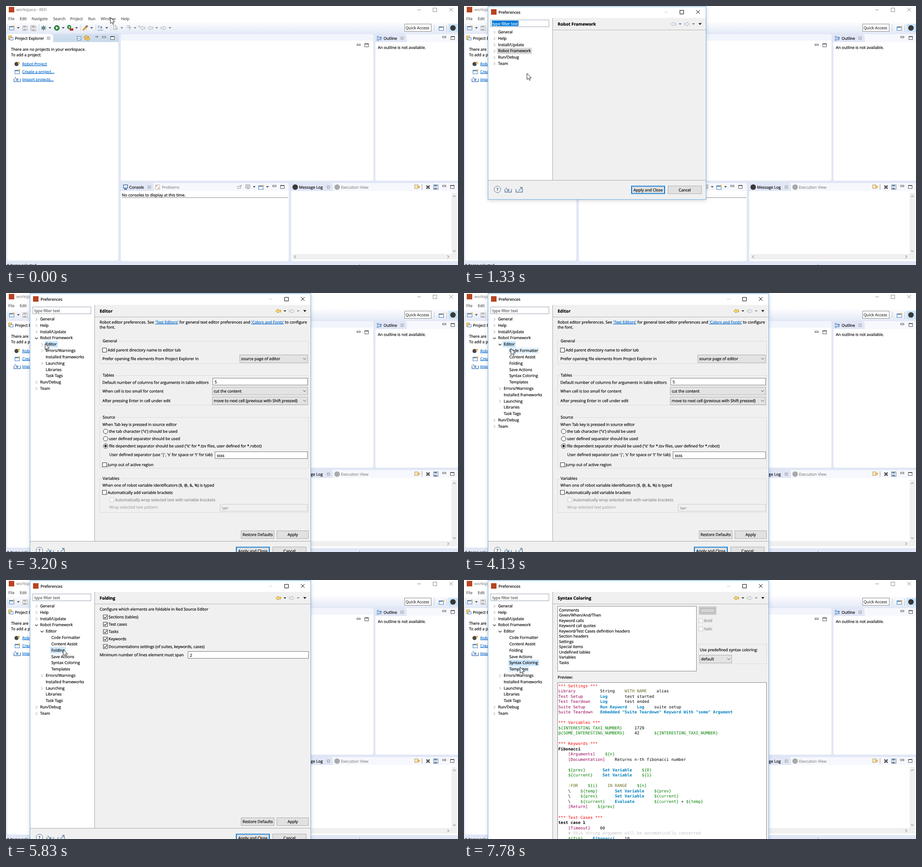
Animation, 987 px wide and 567 px high, one loop 8 s. Source, as an HTML page:

```html
<!DOCTYPE html>
<html lang="en">
<head>
<meta charset="utf-8">
<title>Preferences tour</title>
<style>
html, body { margin: 0; width: 100%; height: 100%; overflow: hidden; background: #fff; }
svg { display: block; width: 100vw; height: 100vh; }
text { font: 8.6px "Open Sans", "Noto Sans", sans-serif; white-space: pre; text-rendering: geometricPrecision; stroke-width: .2px; }
.head { font-size: 9.4px; font-weight: 700; }
.code { font: 8.92px "DejaVu Sans Mono", "Liberation Mono", monospace; stroke: none; }
.link { fill: #0066cc; stroke: #0066cc; text-decoration: underline; }
.mid { text-anchor: middle; }
.b { font-weight: 700; }
#dialog { transform-origin: 290px 212px; }
</style>
</head>
<body>
<svg id="stage" viewBox="0 0 987 567" xmlns="http://www.w3.org/2000/svg"></svg>
<script type="text/plain" id="sample">
*** Settings ***
Library          String    WITH NAME    alias
Test Setup       Log       test started
Test Teardown    Log       test ended
Suite Setup      Run Keyword    Log    suite setup
Suite Teardown   Embedded "Suite Teardown" Keyword With "some" Argument

*** Variables ***
${INTERESTING_TAXI_NUMBER}     1729
@{SOME_INTERESTING_NUMBERS}    42      ${INTERESTING_TAXI_NUMBER}

*** Keywords ***
Fibonacci
    [Arguments]    ${n}
    [Documentation]    Returns n-th fibonacci number

    ${prev}       Set Variable    ${0}
    ${current}    Set Variable    ${1}

    :FOR    ${i}    IN RANGE    ${n}
    \    ${temp}       Set Variable    ${prev}
    \    ${prev}       Set Variable    ${current}
    \    ${current}    Evaluate        ${current} + ${temp}
    [Return]    ${prev}

*** Test Cases ***
test case 1
    [Timeout]    60
    # this string argument will be automatically converted
    ${fib}    Fibonacci    10
</script>
<script>
const LOOP = 8000;
const BLUE = '#4a7ebb', GREY = '#a8a8a8', DIM = '#8a8a8a';

// ---- drawing helpers (text y is the middle of the line) ----
const esc = s => s.replace(/&/g, '&amp;').replace(/</g, '&lt;');
const raw = (x, y, inner, fill = '#000', cls = '') =>
  `<text x="${x}" y="${y + 3}" fill="${fill}" stroke="${fill}" class="${cls}">${inner}</text>`;
const txt = (x, y, s, fill, cls) => raw(x, y, esc(s), fill, cls);
const rect = (x, y, w, h, fill, line) => line
  ? `<rect x="${x + .5}" y="${y + .5}" width="${w - 1}" height="${h - 1}" fill="${fill}" stroke="${line}"/>`
  : `<rect x="${x}" y="${y}" width="${w}" height="${h}" fill="${fill}"/>`;
const path = (d, line = 'none', w = 1, fill = 'none') =>
  `<path d="${d}" stroke="${line}" stroke-width="${w}" fill="${fill}"/>`;
const dot = (x, y, r, fill, line = 'none') =>
  `<circle cx="${x}" cy="${y}" r="${r}" fill="${fill}" stroke="${line}"/>`;
const link = s => `<tspan class="link">${s}</tspan>`;

const drop = (x, y, c = '#333') => path(`M${x - 3} ${y - 1.5}h6l-3 3z`, 'none', 0, c);
const grip = x => path(`M${x} 41v14`, '#a5a9b5', 1.2).replace('/>', ' stroke-dasharray="1.5 2"/>');
const arrow = (x, y, dir, line, fill) =>
  path(`M${x - 5.5 * dir} ${y}l${5 * dir} -4v2h${6 * dir}v4h${-6 * dir}v2z`, line, 1, fill);
const logo = (x, y) => rect(x, y, 12, 12, '#b84420');
const tabClose = (x, y) => {
  const d = `M${x - 3} ${y - 3}l6 6m0 -6l-6 6`;
  return path(d, '#707680', 3) + path(d, '#fff', 1.2);
};
const minIcon = (x, y) => rect(x - 4, y - 3, 8, 4, '#fff', '#555');
const maxIcon = (x, y) => rect(x - 4, y - 4, 9, 8, '#fff', '#555') + rect(x - 4, y - 4, 9, 2, '#555');
const windowIcon = (x, y, star = '#e8b23a') =>
  rect(x - 6, y - 4, 11, 9, '#f4f9ff', BLUE) + rect(x - 6, y - 4, 11, 2.5, BLUE) + dot(x + 4, y - 3.5, 2, star);
const disk = (x, y, c) => rect(x - 5, y - 5, 11, 11, '#f0f0f0', c) + rect(x - 3, y - 5, 6, 4, c) + rect(x - 3, y + 2, 6, 3, c);
const tray = (x, y, dir, c) => path(`M${x - 6.5} ${y - 2}v6.500h14v-6.500`, c, 1.5) +
  (dir > 0 ? path(`M${x - 5} ${y - 5}l7 6.500m0 -4.500v4.500h-4.500`, c, 1.3) : path(`M${x - 1} ${y + 1.5}l8 -7.500m-4.500 0h4.500v4.500`, c, 1.3));
const listIcon = (x, y, c) => rect(x - 5, y - 4, 10, 8, '#fff', c) + path(`M${x - 3} ${y - 1}h6m-6 2h6M${x - 2} ${y + 5}h5`, c);
const frameButtons = (x, y, c, minColor = c) => path(`M${x - 4} ${y + .5}h8`, minColor) +
  rect(x + 30, y - 4, 9, 9, 'none', c) + path(`M${x + 66} ${y - 4}l8 8m0 -8l-8 8`, c);

// ---- workbench ----
const panel = (x, y, w, h) => `<rect x="${x}" y="${y}" width="${w}" height="${h}" rx="4" fill="#fff" stroke="#dae1f2"/>`;
const tab = (x, y, right, fill) =>
  path(`M${x} ${y + 18}V${y + 4}q0 -4 4 -4H${right - 7}q7 0 7 7v11z`, 'none', 0, fill);

function toolbar() {
  let s = rect(0, 36, 987, 25, 'url(#bar)');
  for (const x of [4, 72, 163, 196, 229, 935]) s += grip(x);
  for (const x of [27, 96, 125, 154, 187, 220]) s += drop(x, 48);
  for (const x of [253, 282, 329, 358]) s += drop(x, 48, '#777');
  s += windowIcon(13, 48) + disk(41, 48, '#b5b5b5') + disk(58, 47, '#c4c4c4') + disk(60, 49, '#b5b5b5');
  s += path('M77 44l10 8m0 -8l-10 8M76 48h12M82 42v12', '#3b6372') + dot(82, 48, 3, '#6f9e86', '#2f5a62');
  s += dot(111, 48, 5.5, '#2f8a3f', '#1e6a2e') + path('M109 45l5 3 -5 3z', 'none', 0, '#fff');
  s += dot(138, 46, 4.5, '#2f8a3f') + path('M137 44l4 2 -4 2z', 'none', 0, '#fff') + rect(139, 49, 8, 5, '#b23a32');
  s += path('M168 53l7 -7', '#d9a441', 4) + path('M174 47l4 -4', '#9a7a55', 4);
  s += path('M200 44h6m-6 3h4m-4 6h12', BLUE, 1.2) + path('M208 44v5m-2 -2l2 2 2 -2', '#333');
  s += rect(234, 42, 6, 10, '#eee', GREY) + path('M242 44v8m-3 -3l3 3 3 -3', GREY);
  s += path('M263 43h8m-8 4h4m3 6v-8m-3 3l3 -3 3 3', GREY, 1.2);
  s += arrow(298, 48, 1, GREY, '#f5f5f5') + path('M291 42v5m-2 -2.500h4', GREY);
  s += arrow(315, 48, 1, GREY, '#f5f5f5') + arrow(344, 48, -1, GREY, '#f5f5f5');
  s += rect(870, 39, 59, 17, '#fff', '#8b8b8b') + txt(872.5, 48, 'Quick Access', '#333');
  s += windowIcon(951, 49) + path('M962.500 41v15', '#b5bccb');
  return s + rect(966, 39, 21, 18, '#cbe4f8') + dot(976, 48, 6, '#383838');
}

function workbench() {
  let s = rect(0, 0, 987, 567, '#e1e7f6') + rect(0, 0, 987, 36, '#fff') + logo(6, 2);
  [[5, 'File'], [30, 'Edit'], [56, 'Navigate'], [103, 'Search'], [140, 'Project'], [179.5, 'Run'], [207, 'Window'], [251, 'Help']]
    .forEach(([x, name]) => s += txt(x, 27.5, name, '#555'));
  s += toolbar();

  s += panel(2, 61, 244, 497) + path('M2 79V65q0 -4 4 -4H242q4 0 4 4v14z', 'none', 0, 'url(#active)') + tab(2, 61, 103, '#fff');
  s += rect(5, 65, 8, 9, '#f6d98c', '#c08a2c') + rect(8, 69, 8, 6, '#fff', BLUE) + txt(19.5, 70.5, 'Project Explorer') + tabClose(93, 70.5);
  s += rect(155, 66, 9, 9, '#f4f9ff', BLUE) + path('M157 70.500h5', BLUE) + arrow(175, 68, 1, '#c28a20', '#f3cf6b') + arrow(178, 72, -1, '#c28a20', '#f3cf6b');
  s += path('M195.500 66.500h6l-3 3z', '#555', 1, '#fff') + minIcon(214, 69) + maxIcon(232, 70);
  s += txt(11, 95, 'There are no projects in your workspace.') + txt(11, 106.5, 'To add a project:');
  s += dot(23, 127, 4.5, '#484848') + rect(26, 122, 4, 5, '#e5b95a');
  s += windowIcon(25, 144) + tray(24, 161, 1, BLUE);
  ['Robot Project', 'Create a project...', 'Import projects...'].forEach((n, i) => s += raw(35.5, 126.5 + 17 * i, link(n)));

  s += panel(250, 61, 553, 322) + rect(251, 62, 551, 14, '#f2f5fc') + minIcon(770, 86) + maxIcon(787, 86);

  s += panel(806, 61, 186, 322) + rect(807, 62, 180, 17, '#f6f8fd') + tab(806, 61, 875, '#e1e7f6');
  s += rect(810, 66, 4, 4, '#fff', BLUE) + rect(810, 72, 4, 4, '#fff', BLUE) + path('M815 68.500h5m-5 5h5m-4 -3h5', BLUE, 1.3);
  s += txt(824.5, 70.5, 'Outline') + tabClose(865, 70.5) + minIcon(957, 69) + maxIcon(975, 70) + txt(812, 91, 'An outline is not available.');

  s += panel(250, 387, 368, 172) + rect(251, 388, 366, 17, '#f6f8fd') + tab(250, 387, 323, '#e1e7f6');
  s += rect(256, 391, 10, 8, '#dcebfa', '#244f86') + rect(258, 400, 6, 2, '#244f86') + txt(269, 396.5, 'Console') + tabClose(313, 396.5);
  s += rect(326, 391, 10, 11, '#fff', '#b9b9b9') + dot(329, 394, 1.6, '#d88') + dot(333, 399, 1.8, '#e5bd78') + txt(340.5, 396.5, 'Problems', DIM);
  s += rect(505, 394, 8, 6, '#eee', GREY) + path('M510 395l5 -3', GREY, 2) + listIcon(528, 395, DIM) + drop(542, 396) + windowIcon(557, 397) + drop(571, 396);
  s += minIcon(586, 395) + maxIcon(603, 396) + txt(253, 413.5, 'No consoles to display at this time.') + path('M253 419.500h363', '#8c8c8c');

  s += panel(622, 387, 370, 172) + rect(623, 388, 364, 17, '#f6f8fd') + tab(622, 387, 714, '#e1e7f6');
  s += dot(631.5, 396.5, 6, '#383838') + txt(640, 396.5, 'Message Log') + tabClose(704, 396.5) + dot(723, 396.5, 6, '#a9a9a9') + txt(731.5, 396.5, 'Execution View', DIM);
  s += rect(892, 391, 8, 9, '#f5e8c8', '#b79a66') + dot(901, 396, 3, '#e6b85c') + path('M908.500 390v12', '#999');
  s += path('M918 393l7 7m0 -7l-7 7', '#555', 2.6) + disk(938, 396, '#6d87aa') + minIcon(957, 395) + maxIcon(974, 396);
  s += rect(973, 409, 12, 134, '#f0f0f0') + rect(625, 543, 360, 12, '#f0f0f0');
  s += path('M976 418l3 -3 3 3M976 535l3 3 3 -3M633 546l-3 3 3 3M964 546l3 3 -3 3', '#999', 1.2);
  return s + txt(2, 568, '0 items selected') + path('M772.500 564v3', '#999');
}

// ---- Window menu ----
const MENU = ['New Window', 'Editor', 'Appearance', '-', 'Show View', 'Perspective', '-', 'Navigation', '-', 'Preferences'];
const menuRow = (y, name, fill) => rect(203.5, y, 119, 16.8, fill) + txt(228, y + 8.4, name, '#333');

function menu(cursorY) {
  let s = rect(204, 20, 40, 16, '#cce8ff', '#99d1ff') + txt(207, 27.5, 'Window', '#333') +
    `<g filter="url(#soft)">${rect(201, 36, 124, 137, '#f2f2f2', '#ccc')}</g>`;
  let y = 38;
  for (const name of MENU) {
    if (name === '-') { s += path(`M226 ${y + 2.7}h96`, '#d2d2d2'); y += 5.5; continue; }
    s += menuRow(y, name, cursorY >= y && cursorY < y + 16.6 ? '#91c9f7' : '#f2f2f2');
    if (!/New|Pref/.test(name)) s += path(`M314 ${y + 6}l2.500 2.500 -2.500 2.500`, '#333');
    y += 16.6;
  }
  return s;
}

// ---- preference tree ----
const pen = document.createElement('canvas').getContext('2d');
pen.font = '8.6px "Open Sans", "Noto Sans", sans-serif';
const EDITOR_PAGES = ['Code Formatter', 'Content Assist', 'Folding', 'Save Actions', 'Syntax Coloring', 'Templates'];

function treeRows(t) {
  const root = t >= 2110, editor = t >= 3670;
  const leaf = (depth, names) => names.map(n => [depth, n, '']);
  const shut = (depth, names) => names.map(n => [depth, n, '>']);
  return [...shut(0, ['General', 'Help', 'Install/Update']), [0, 'Robot Framework', root ? 'v' : '>'],
    ...(root ? [[1, 'Editor', editor ? 'v' : '>'], ...(editor ? leaf(2, EDITOR_PAGES) : []),
      ...shut(1, ['Errors/Warnings']), ...leaf(1, ['Installed frameworks']),
      ...shut(1, ['Launching']), ...leaf(1, ['Libraries', 'Task Tags'])] : []),
    ...shut(0, ['Run/Debug', 'Team'])];
}

function tree(t, picked, cur) {
  return treeRows(t).map(([depth, name, mark], i) => {
    const x = 74.5 + 12.2 * depth, y = 57 + 13.82 * i, w = pen.measureText(name).width + 5;
    const over = Math.abs(cur.y - y) < 6.91 && cur.x > x - 3 && cur.x < x + w;
    const fill = name === picked ? (t < 2110 ? '#d9d9d9' : '#cce8ff') : over ? '#e5f3ff' : '';
    const ax = x - 8;
    return (fill ? rect(x - 2.5, y - 7, w, 13.8, fill) : '') + txt(x, y, name) +
      (mark === '>' ? path(`M${ax - 1.5} ${y - 2.5}l3 3 -3 3`, '#8c8c8c') : '') +
      (mark === 'v' ? path(`M${ax - 3} ${y - 1}l3 3 3 -3`, '#333', 1.2) : '');
  }).join('');
}

// ---- form controls ----
const check = (x, y, label, on, off) => rect(x, y - 5, 10, 10, off ? '#f8f8f8' : '#fff', off ? '#ccc' : '#333') +
  (on ? path(`M${x + 2} ${y}l2.300 2.500 4 -5`, '#222', 1.2) : '') + txt(x + 12, y, label, off ? DIM : '#000');
const radio = (y, label, on) => dot(217.5, y, 5, '#fff', '#333') + (on ? dot(217.5, y, 2.7, '#222') : '') + txt(225, y, label);
const field = (x, y, right, value, off) =>
  rect(x, y - 8, right - x, 16, off ? '#f0f0f0' : '#fff', off ? '#ccc' : '#7a7a7a') + txt(x + 4.5, y + .5, value, off ? DIM : '#000');
const combo = (x, y, right, value) => rect(x, y - 9, right - x, 18, '#e3e3e3', '#adadad') + txt(x + 3.5, y, value) +
  path(`M${right - 10} ${y - 1.5}l3 3 3 -3`, '#444');
const group = (y, bottom, title) => rect(204, y, 457, bottom - y, 'none', '#dcdcdc') +
  rect(209, y - 3, pen.measureText(title).width + 4, 6, '#f0f0f0') + txt(211, y, title);
const button = (x, y, w, label, main) => rect(x, y, w, 18, '#e1e1e1', main ? '#0078d7' : '#adadad') +
  (main ? rect(x + 1, y + 1, w - 2, 16, 'none', '#0078d7') : '') + txt(x + w / 2, y + 9, label, '#000', 'mid');

// ---- sample source ----
const SAMPLE = document.getElementById('sample').textContent.trim().split('\n');
const RULES = [
  [/^\*\*\*.*/, '#ff0000'],
  [/^(Fibonacci|test case 1)$/, '#000', 'b'],
  [/^(Library|(Test|Suite) (Setup|Teardown))|^\[\w+\]/, '#960056'],
  [/^[$@]\{\w+\}/, '#008000'],
  [/^(:FOR|IN RANGE|WITH NAME)/, '#6b6b1f'],
  [/^(Embedded.*|Run Keyword|Log|Set Variable|Evaluate|Fibonacci)/, '#0080c0', 'b'],
  [/^#.*/, '#c0c0c0'],
  [/^(\s+|\S+)/, '#000'],
];

function paint(line) {
  let out = '';
  while (line) {
    const [re, fill, cls = ''] = RULES.find(([re]) => re.test(line));
    const word = line.match(re)[0];
    out += `<tspan fill="${fill}" class="${cls}">${esc(word)}</tspan>`;
    line = line.slice(word.length);
  }
  return out;
}

// ---- preference pages ----
const PAGES = {
  'Robot Framework': () => '',
  'Editor': () =>
    raw(204.5, 63.5, `Robot editor preferences. See ${link("'Text Editors'")} for general text editor preferences and ${link("'Colors and Fonts'")} to configure`) +
    txt(204.5, 75, 'the font.') +
    group(105, 155, 'General') + check(210, 125, 'Add parent directory name to editor tab') +
    txt(210.5, 144, 'Prefer opening file elements from Project Explorer in') + combo(510, 144, 659, 'source page of editor') +
    group(180, 246, 'Tables') + txt(210.5, 195.5, 'Default number of columns for arguments in table editors') + field(451, 194, 659, '5') +
    txt(210.5, 214.5, 'When cell is too small for content') + combo(450, 214.5, 659, 'cut the content') +
    txt(210.5, 236, 'After pressing Enter in cell under edit') + combo(450, 236, 659, 'move to next cell (previous with Shift pressed)') +
    group(272, 384, 'Source') + txt(210.5, 287.5, 'When Tab key is pressed in source editor') +
    radio(303, "the tab character ('\\t') should be used") + radio(319, 'user defined separator should be used') +
    radio(335, "file dependent separator should be used ('\\t' for *.tsv files, user defined for *.robot)", true) +
    txt(225.5, 353.5, "User defined separator (use '|', 's' for space or 't' for tab)") + field(456, 355, 659, 'ssss') +
    check(210, 376, 'Jump out of active region') +
    group(406, 481, 'Variables') + txt(210.5, 421, 'When one of robot variable identificators ($, @, &, %) is typed') +
    check(210, 436.5, 'Automatically add variable brackets') +
    check(226, 452.5, 'Automatically wrap selected text with variable brackets', false, true) +
    txt(225.5, 468.5, 'Wrap selected text pattern', GREY) + field(467, 470, 659, '\\w+', true),
  'Code Formatter': () =>
    txt(204.5, 63.5, 'Configure how source code should be formatted') +
    check(211, 81, 'Adjust separator lengths', true) + txt(225.5, 99, 'Separator length') + field(397, 99, 661, '4') +
    check(211, 118, 'Right trim lines', true),
  'Content Assist': () =>
    txt(204.5, 63.5, 'Configure content assistant in Red Source Editor') +
    group(90, 176, 'Auto activation') + check(210, 108, 'Enable auto activation', true) +
    txt(210.5, 130, 'Auto activation delay (ms)') + field(451, 130, 659, '100') +
    txt(210.5, 154, 'Auto activation triggers') + field(451, 154, 659, '') +
    group(202, 262, 'Keywords') + check(210, 220, 'Automatically add keyword prefixes') +
    check(210, 240, 'Include keywords from not imported libraries') +
    group(288, 350, 'Separator') + txt(210.5, 314, 'Separator after inserted proposal') + field(451, 314, 659, 'ssss'),
  'Folding': () =>
    txt(204.5, 63.5, 'Configure which elements are foldable in Red Source Editor') +
    ['Sections (tables)', 'Test cases', 'Tasks', 'Keywords', 'Documentations settings (of suites, keywords, cases)']
      .map((n, i) => check(212, 81 + 16.15 * i, n, true)).join('') +
    txt(204.5, 164, 'Minimum number of lines element must span') + field(397, 164, 661, '2'),
  'Save Actions': () =>
    txt(204.5, 63.5, 'Configure actions performed on save') +
    group(90, 165, 'Code formatting') + check(210, 108, 'Automatically format source code') +
    radio(126, 'Format all lines', true) + radio(143, 'Format edited lines') +
    group(190, 245, 'Validation') + check(210, 210, 'Run validation after saving', true),
  'Syntax Coloring': () =>
    rect(204, 57, 304, 143, '#fff', '#828790') +
    ['Comments', 'Given/When/And/Then', 'Keyword calls', 'Keyword call quotes', 'Keyword/Test Cases definition headers', 'Section headers',
      'Settings', 'Special items', 'Undefined tables', 'Variables', 'Tasks'].map((n, i) => txt(207.5, 65.5 + 11.5 * i, n)).join('') +
    rect(513, 58, 38, 18, '#ccc', '#bfbfbf') + rect(516, 62, 32, 10, '#d4d4d4', '#a5a5a5') +
    check(512, 89, 'Bold', false, true) + check(512, 107, 'Italic', false, true) +
    rect(512, 140, 149, 44, 'none', '#dcdcdc') + txt(515, 152.5, 'Use predefined syntax coloring:') + combo(514, 173, 585, 'default') +
    txt(204.5, 212.5, 'Preview:') + rect(204, 224, 457, 400, '#fff', '#828790') +
    SAMPLE.map((line, i) => raw(206, 231.5 + 11.52 * i, paint(line), '#000', 'code')).join(''),
};

const PICKS = [[0, 'Robot Framework'], [2570, 'Editor'], [4440, 'Code Formatter'], [5140, 'Content Assist'],
  [5830, 'Folding'], [6530, 'Save Actions'], [7330, 'Syntax Coloring']];

function dialog(t, cur) {
  const big = t >= 2800, dx = big ? 137 : 0, foot = t >= 7330 ? 700 : big ? 543 : 381;
  const right = 529 + dx;
  const picked = PICKS.filter(p => p[0] <= t).pop()[1];
  const page = big ? picked : 'Robot Framework';
  let s = `<g filter="url(#soft)">${rect(52, 1, right - 52, foot + 42, '#f0f0f0', '#6fb0e6')}</g>`;
  s += rect(53, 2, right - 54, 24, '#fff') + rect(53, 26, 141, foot - 26, '#fff');
  s += logo(59, 7) + txt(75.5, 13.5, 'Preferences') + frameButtons(441 + dx, 13, '#000', '#ccc');
  s += path(`M193.500 26V${foot}M53 ${foot + .5}H${right - 1}`, '#a9a9a9') + path(`M194 52.500H${right - 1}`, '#b4b4b4');
  s += rect(58, 30, 128, 16, '#fff', '#9aa7b5');
  if (t < 2110) s += rect(61, 32, 58, 12, '#0078d7');
  s += txt(62, 38.5, 'type filter text', t < 2110 ? '#fff' : '#555');
  s += txt(204.5, 40, page, '#000', 'head');
  s += arrow(457.5 + dx, 39.5, 1, big ? '#b98718' : '#a9b0bb', big ? '#ffe27a' : '#f5f5f5') + arrow(487 + dx, 39.5, -1, '#a9b0bb', '#f5f5f5');
  s += drop(472 + dx, 39.5, big ? '#222' : '#3f6ea5') + drop(501 + dx, 39.5, big ? '#888' : '#3f6ea5') + path(`M${512 + dx} 37.500h7l-3.500 4z`, 'none', 0, '#111');
  s += tree(t, picked, cur) + PAGES[page]();
  if (foot === 543) s += button(513, 520, 73, 'Restore Defaults') + button(591, 520, 70, 'Apply');
  if (foot < 600) {
    s += dot(73, foot + 20.5, 7, '#fff', '#4d6682') + txt(73, foot + 21, '?', '#3d5a7d', 'mid head') + tray(96, foot + 22, 1, '#5b7ea8') + tray(120, foot + 22, -1, '#5b7ea8');
    s += button(365 + dx, foot + 12.5, 74, 'Apply and Close', true) + button(445 + dx, foot + 12.5, 74, 'Cancel');
  }
  return s;
}

// ---- pointer: [first step, last step, steps, x, y] ----
const MOVES = [[230, 620, 6, 253.5, 155.5], [770, 770, 1, 254, 158], [1100, 1330, 4, 137.5, 147.5], [1410, 1730, 5, 68, 97],
  [1800, 1960, 3, 72, 102], [2290, 2420, 3, 92, 109], [2570, 2570, 1, 95, 111], [3050, 3350, 5, 79, 111],
  [3900, 4130, 4, 102.5, 121.5], [4670, 4740, 2, 133.5, 140], [4910, 4910, 1, 134, 141.5], [5220, 5520, 5, 125, 152],
  [6290, 6380, 2, 126, 164], [6760, 7080, 5, 126, 179], [7730, 7780, 2, 122.5, 190.5]];

function pointer(t) {
  let x = 228, y = 25;
  for (const [from, to, n, tx, ty] of MOVES) {
    if (t < from) break;
    const step = n > 1 ? Math.min(n - 1, Math.floor((t - from) / (to - from) * (n - 1) + 1e-6)) : 0;
    x += (tx - x) * (step + 1) / n;
    y += (ty - y) * (step + 1) / n;
  }
  return { x, y };
}

// ---- scene ----
const stage = document.getElementById('stage');
stage.innerHTML = `<defs>
  <linearGradient id="bar" x2="0" y2="1"><stop stop-color="#fbfcfe"/><stop offset="1" stop-color="#e3e9f6"/></linearGradient>
  <linearGradient id="active" x2="0" y2="1"><stop stop-color="#d3e1f0"/><stop offset="1" stop-color="#c8d9ea"/></linearGradient>
  <filter id="soft" x="-10%" y="-10%" width="120%" height="120%"><feDropShadow dx="0" dy="2" stdDeviation="4" flood-opacity=".17"/></filter>
  </defs>${workbench()}<g id="caption"></g><g id="menu"></g><g id="pick">${menuRow(154, 'Preferences', '#91c9f7')}</g><g id="dialog"></g>
  <g id="arrow">${path('M0 0V13.500L3.200 10.600 5.300 15.300 7.300 14.400 5.300 9.800H9.500Z', '#111', .9, '#fff')}</g>
  <g id="busy">${dot(0, 0, 7, '#1b87d2')}${dot(0, 0, 2.8, '#d7effc')}${path('M0 -5A5 5 0 0 1 5 0', '#6cc6f5', 2)}</g>`;
const $ = id => document.getElementById(id);
const cache = {};
function fill(id, html) {
  if (cache[id] !== html) $(id).innerHTML = cache[id] = html;
}
const show = (id, opacity) => {
  $(id).style.display = opacity ? '' : 'none';
  $(id).style.opacity = opacity;
};

function draw(t) {
  const cur = pointer(t), active = t >= 150 && t < 1180;
  const ink = active ? '#000' : '#8f8f8f';
  fill('caption', txt(22.5, 8, 'workspace - RED', ink) + frameButtons(902, 8, ink));

  const menuOn = t >= 150 && t < 940;
  show('menu', menuOn ? (t < 230 ? .6 : 1) : 0);
  if (menuOn) fill('menu', menu(cur.y));
  show('pick', t < 940 || t >= 1180 ? 0 : t < 1030 ? 1 : t < 1100 ? .62 : .3);

  const open = t < 1180 ? 0 : t < 1250 ? .5 : t < 1330 ? .85 : 1;
  show('dialog', open);
  $('dialog').style.transform = open < 1 ? `scale(${.88 + .12 * open})` : '';
  if (open) fill('dialog', dialog(t, cur));

  const waiting = t >= 2650 && t < 2880;
  show('arrow', waiting ? 0 : 1);
  show('busy', waiting ? 1 : 0);
  $('arrow').setAttribute('transform', `translate(${cur.x} ${cur.y})`);
  $('busy').setAttribute('transform', `translate(${cur.x} ${cur.y}) rotate(${t * .36 % 360})`);
}

const start = performance.now();
function frame(now) {
  draw(Math.max(0, now - start) % LOOP);
  requestAnimationFrame(frame);
}
draw(0);
requestAnimationFrame(frame);
</script>
</body>
</html>
```
